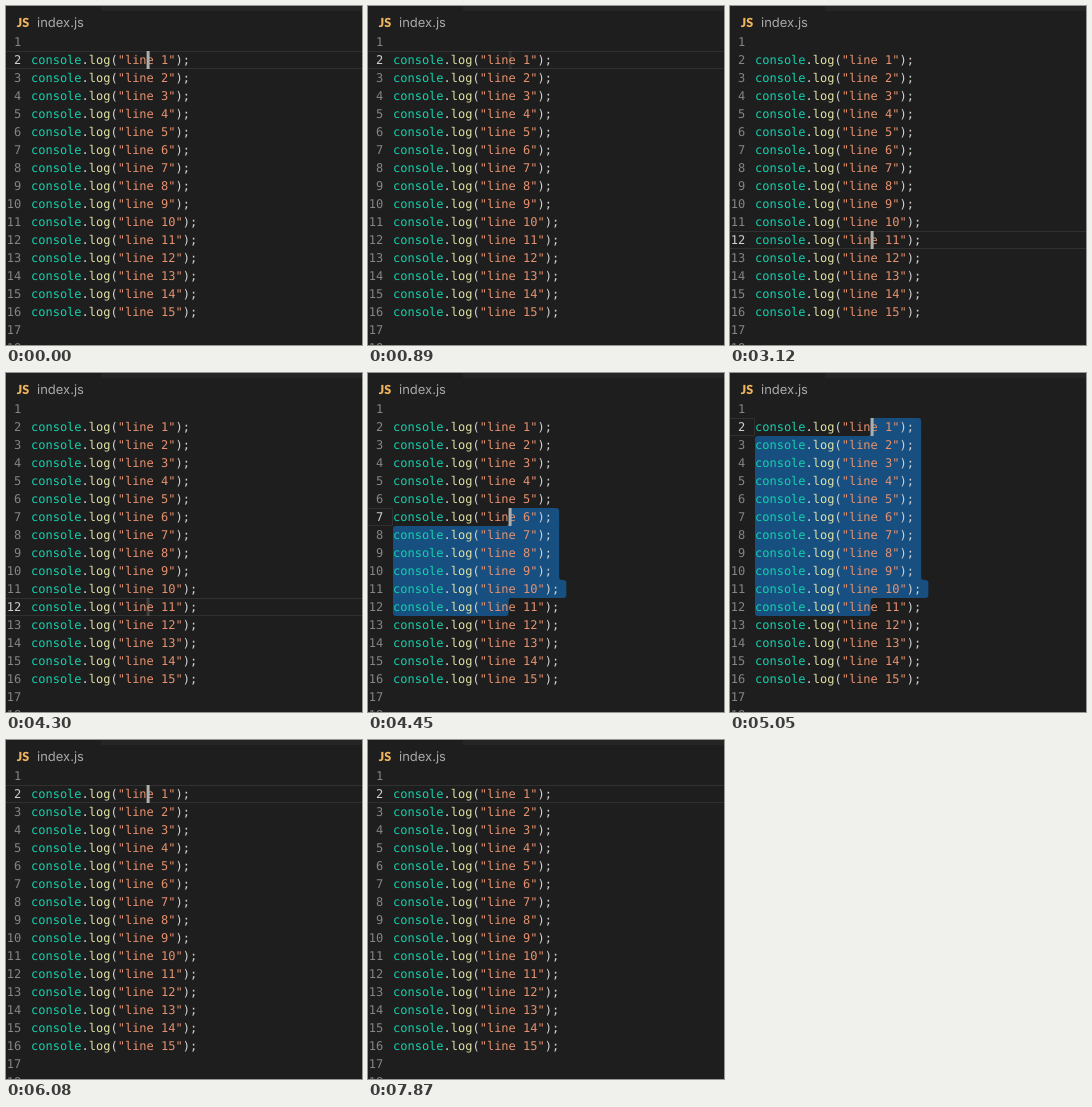
Recreate the animation shown at these times as an HTML page. Size 356 by 339 pixels, loop 8 s.

```html
<!DOCTYPE html>
<html lang="en">
<head>
<meta charset="utf-8">
<title>Selecting lines in an editor</title>
<style>
  html, body { margin: 0; width: 100%; height: 100%; overflow: hidden; background: #1e1e1e; }
  svg { display: block; }
  text { font: 12px "DejaVu Sans Mono", monospace; text-rendering: geometricPrecision; white-space: pre; fill: #d4d4d4; }
  .num { fill: #858585; text-anchor: end; }
  .num.active { fill: #d0d0d0; }
  .obj { fill: #16d0ac; }
  .fn { fill: #e2e2a6; }
  .str { fill: #e6926f; }
  text.file { font: 13px Inter, sans-serif; fill: #a9a9a9; }
  text.type { font: 900 12.5px Lato, sans-serif; fill: #f0b45c; }
</style>
</head>
<body>
<svg id="stage" width="356" height="339" viewBox="0 0 356 339">
  <rect x="95" width="261" height="5" fill="#252526"/>
  <text class="type" x="10.8" y="20.5">JS</text>
  <text class="file" x="31" y="20.6">index.js</text>
  <path id="current" fill="none" stroke="#303030"/>
  <path id="selection" fill="#164f80"/>
  <g id="lines"></g>
  <rect id="cursor" x="140.6" width="3" height="18" fill="#aeafad"/>
</svg>
<script>
const LOOP = 8000, TICK = 148.4, ROW = 18, LEFT = 25, CHAR = 7.224, COLUMN = 16;
const $ = id => document.getElementById(id);
const rowTop = n => 9 + ROW * n;
const colX = c => LEFT + CHAR * c;

// Clicks: the cursor jumps to a line; an anchor line makes it a selection
const clicks = [
  { at: -350, line: 2 },
  { at: 2300, line: 7 },
  { at: 3040, line: 12 },
  { at: 4380, line: 7, anchor: 12 },
  { at: 4970, line: 2, anchor: 12 },
  { at: 6065, line: 2 }
];

// Solid for 500 ms after a click, then a smooth one-second blink
function cursorOpacity(age) {
  if (age < 500) return 1;
  const phase = (age - 500) % 1000;
  const fromPeak = Math.min(phase, 1000 - phase);
  const k = Math.min(1, Math.max(0, (300 - fromPeak) / 200));
  return k * k * (3 - 2 * k);
}

function addText(x, y, cls, str) {
  const el = document.createElementNS("http://www.w3.org/2000/svg", "text");
  el.setAttribute("x", x);
  el.setAttribute("y", y);
  el.setAttribute("class", cls);
  el.textContent = str;
  $("lines").append(el);
  return el;
}

const numbers = [];
for (let n = 1; n <= 18; n++) {
  const y = rowTop(n) + 13.2;
  numbers[n] = addText(15.3, y, "num", n);
  if (n < 2 || n > 16) continue;
  let col = 0;
  for (const [cls, str] of [["obj", "console"], ["", "."], ["fn", "log"], ["", "("],
                            ["str", `"line ${n - 1}"`], ["", ");"]]) {
    addText(colX(col), y, cls, str);
    col += str.length;
  }
}

// Closed polygon with every corner rounded by r
function roundedPath(points, r) {
  const toward = ([x, y], [u, v]) => {
    const k = r / Math.hypot(u - x, v - y);
    return [x + (u - x) * k, y + (v - y) * k];
  };
  return points.map((p, i) => {
    const prev = points.at(i - 1), next = points[(i + 1) % points.length];
    return `${i ? "L" : "M"}${toward(p, prev)}Q${p} ${toward(p, next)}`;
  }).join("") + "Z";
}

// Line 11 is one character longer than those above it
function selectionPath(from, to) {
  const mid = colX(COLUMN), short = colX(23), long = colX(24);
  const y1 = rowTop(from), y2 = rowTop(to), wide = rowTop(11);
  return roundedPath([
    [mid, y1], [short, y1], [short, wide], [long, wide], [long, y2], [mid, y2],
    [mid, y2 + ROW], [LEFT, y2 + ROW], [LEFT, y1 + ROW], [mid, y1 + ROW]
  ], 3);
}

// The frame of the current line shrinks to the gutter while text is selected
function currentPath(y, selecting) {
  const a = y + 0.5, b = y + ROW - 0.5;
  return selecting ? `M0 ${a}H24.5V${b}H0` : `M0 ${a}H356M0 ${b}H356`;
}

function draw(now) {
  // The screen is refreshed in coarse ticks
  const t = Math.floor((now % LOOP + 10) / TICK) * TICK;
  const { at, line, anchor } = clicks.findLast(c => c.at <= t);
  const y = rowTop(line);
  numbers.forEach((el, n) => el.classList.toggle("active", n === line));
  $("cursor").setAttribute("y", y);
  $("cursor").setAttribute("opacity", cursorOpacity(t - at));
  $("current").setAttribute("d", currentPath(y, anchor));
  $("selection").setAttribute("d", anchor ? selectionPath(line, anchor) : "");
}

const start = performance.now();
function tick() {
  draw(performance.now() - start);
  requestAnimationFrame(tick);
}
tick();
</script>
</body>
</html>
```
